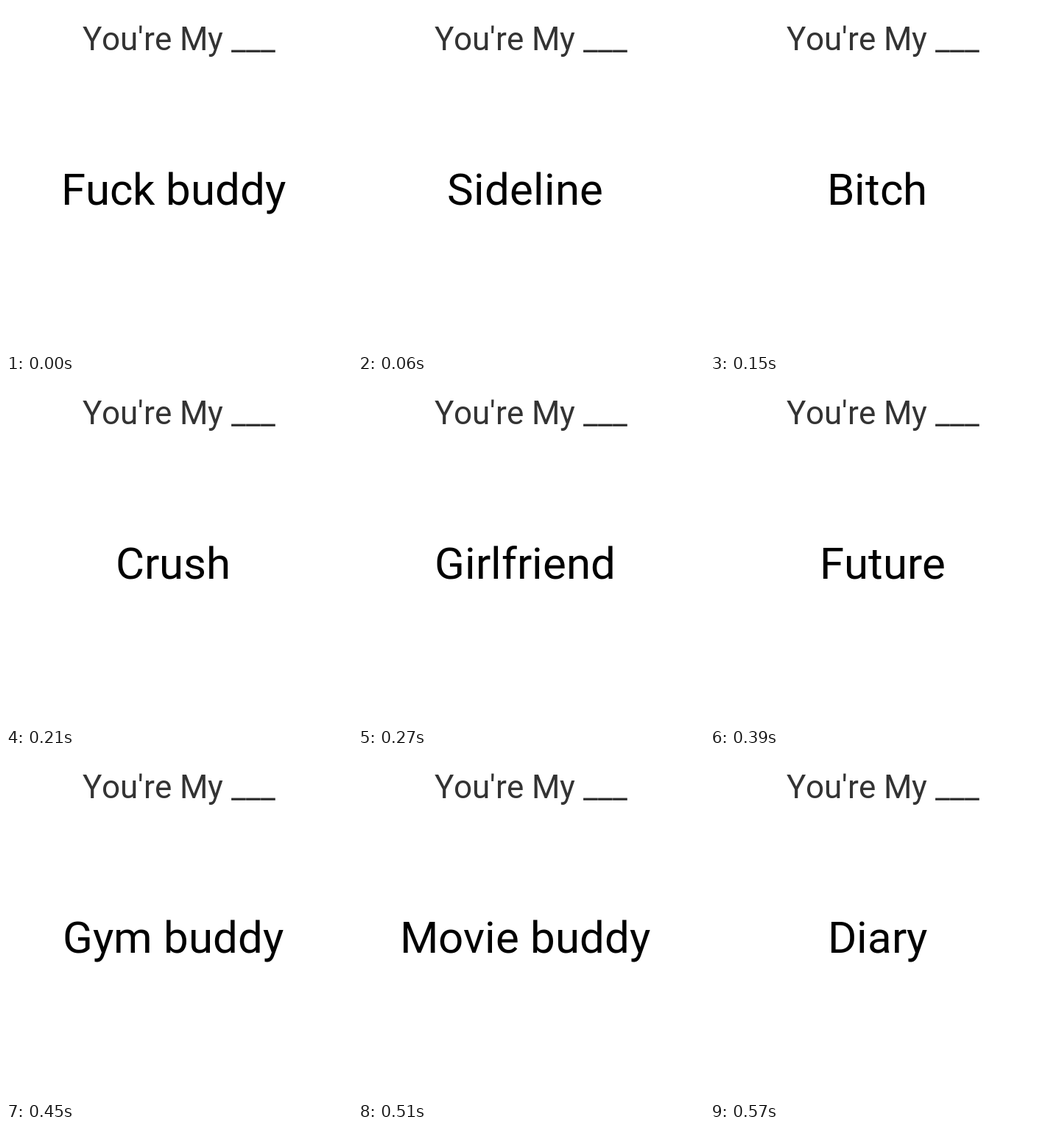
These frames come from a looping animation (470 by 470 pixels, 600 ms). An HTML page with a canvas:

```html
<!DOCTYPE html>
<html lang="en">
<head>
<meta charset="utf-8">
<title>You're My ___</title>
<style>
  html, body { margin: 0; width: 100%; height: 100%; overflow: hidden; background: #fff; }
  canvas { display: block; }
</style>
</head>
<body>
<canvas id="stage" width="470" height="470"></canvas>
<script>
  const SIZE = 470;
  const STEP = 30;
  const words = [
    "Fuck buddy ", "Best friend ", "Sideline ", "Soulmate ", "Partner ",
    "Bitch ", "Sunshine ", "Crush ", "Boyfriend ", "Girlfriend ",
    "Lover ", "Teacher ", "Everything ", "Future", "Sister ",
    "Gym buddy ", "Brother ", "Movie buddy ", "Baby ", "Diary "
  ];
  const ctx = document.getElementById("stage").getContext("2d");

  // Centred line without kerning; every glyph starts on a whole pixel.
  function line(text, size, color, y) {
    ctx.font = `${size}px Roboto, sans-serif`;
    ctx.fillStyle = color;
    const chars = [...text];
    const steps = chars.map(c => Math.round(ctx.measureText(c).width));
    const width = steps.reduce((a, b) => a + b, 0);
    let x = Math.floor((SIZE - width) / 2);
    chars.forEach((c, i) => {
      ctx.fillText(c, x, y);
      x += steps[i];
    });
  }

  function draw(i) {
    ctx.fillStyle = "#fff";
    ctx.fillRect(0, 0, SIZE, SIZE);
    line("You're My ___", 44, "#333", 60);
    line(words[i], 60, "#000", 270);
  }

  const start = performance.now();
  function tick(now) {
    draw(Math.floor(Math.max(0, now - start) / STEP) % words.length);
    requestAnimationFrame(tick);
  }
  draw(0);
  requestAnimationFrame(tick);
</script>
</body>
</html>
```
